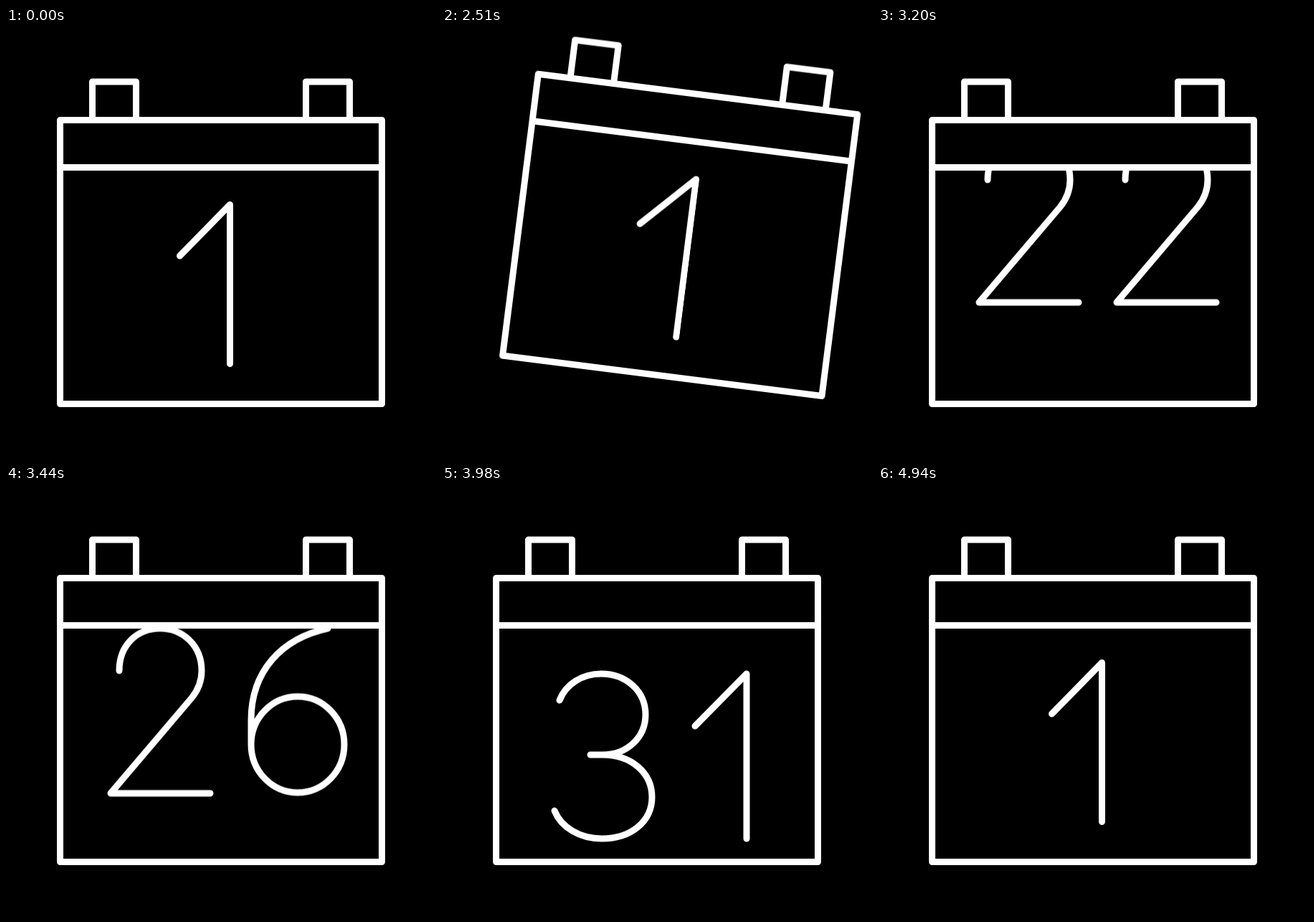
Write an HTML page that moves like this. It is 600 by 600 pixels and loops after 4970 ms.

```html
<!DOCTYPE html>
<html lang="en">
<head>
<meta charset="utf-8">
<title>Calendar</title>
<style>
  html, body { margin: 0; width: 100%; height: 100%; overflow: hidden; background: #000; }
  svg { display: block; width: 100vw; height: 100vh; }
  .lines {
    fill: none; stroke: #fff; stroke-width: 9;
    stroke-linecap: round; stroke-linejoin: round;
  }
  #calendar { transform-origin: 300px 326px; animation: swing 4970ms infinite; }
  #drop { animation: drop 4970ms infinite; }

  /* lift and tilt, slam down past rest, settle */
  @keyframes swing {
    0% { transform: translate(0, 0) rotate(0deg); }
    40.241% {
      transform: translate(0, 0) rotate(0deg);
      animation-timing-function: cubic-bezier(.25, 0, .3, 1);
    }
    48.089% {
      transform: translate(34.8px, -41.7px) rotate(8deg);
      animation-timing-function: cubic-bezier(.8, 0, .2, 1);
    }
    56.137% {
      transform: translate(2px, 10px) rotate(-2deg);
      animation-timing-function: cubic-bezier(.35, 0, .4, 1);
    }
    61.972%, 100% { transform: translate(0, 0) rotate(0deg); }
  }

  /* the first day falls back in */
  @keyframes drop {
    0% { transform: translateY(-290px); }
    84.507% {
      transform: translateY(-290px);
      animation-timing-function: cubic-bezier(.3, .6, .6, 1);
    }
    90.141% {
      transform: translateY(15px);
      animation-timing-function: cubic-bezier(.25, 0, .3, 1);
    }
    99.598%, 100% { transform: translateY(0); }
  }
</style>
</head>
<body>
<svg viewBox="0 0 600 600">
  <clipPath id="page"><rect x="76" y="195" width="449" height="329"/></clipPath>
  <g id="calendar" class="lines">
    <g clip-path="url(#page)">
      <g id="reel"></g>
      <path id="drop"/>
    </g>
    <path d="M75.5 128.5H524.5V524.5H75.5ZM75.5 194.5H524.5
             M120.5 128V75H181.5V128M418.5 128V75H479.5V128"/>
  </g>
</svg>
<script>
  const LOOP = 4970, PITCH = 400, BASE = 468;
  const FIRST_DAY = 'M242.5 318L312.5 246.5V468.5';

  // [advance, path], baseline at y = 0
  const GLYPHS = [
    [192, 'M103 -230A73 115 0 1 1 103 0A73 115 0 1 1 103 -230Z'],
    [140, 'M27 -157L99 -230V0'],
    [192, 'M45 -171C45 -207 70 -230 102 -230S160 -206 160 -171Q160 -150 146 -133L33 0H172'],
    [192, 'M30 -193C39 -216 62 -230 88 -230C124 -230 150 -205 150 -173S124 -117 90 -117H73H90C130 -117 159 -92 159 -58S130 0 89 0C58 0 32 -16 23 -39'],
    [190, 'M140 0V-230L30 -60H176'],
    [184, 'M155 -230H62L52 -130C100 -155 168 -140 168 -76C168 -30 135 0 95 0C65 0 42 -14 28 -36'],
    [182, 'M144 -230C79 -216 37 -170 37 -102V-68A65 67 0 1 0 167 -68A65 67 0 1 0 37 -68'],
    [180, 'M25 -230H160L70 0'],
    [190, 'M93 -118A56 56 0 1 1 93 -230A56 56 0 1 1 93 -118A67 59 0 1 1 93 0A67 59 0 1 1 93 -118Z'],
    [182, 'M167 -162A65 67 0 1 0 37 -162A65 67 0 1 0 167 -162V-128C167 -60 125 -14 60 0']
  ];

  const reel = document.getElementById('reel');
  const drop = document.getElementById('drop');
  drop.setAttribute('d', FIRST_DAY);

  function addPath(d, x, y) {
    const path = document.createElementNS('http://www.w3.org/2000/svg', 'path');
    path.setAttribute('d', d);
    path.setAttribute('transform', `translate(${x} ${y})`);
    reel.append(path);
  }

  function addDay(day) {
    const glyphs = [...String(day)].map(c => GLYPHS[c]);
    let x = 300 - glyphs.reduce((sum, [width]) => sum + width, 0) / 2;
    for (const [width, d] of glyphs) {
      addPath(d, x, BASE - (day - 1) * PITCH);
      x += width;
    }
  }

  addPath(FIRST_DAY, 0, 0);
  for (let day = 2; day <= 31; day++) addDay(day);

  // The days rush past at a speed that decays exponentially.
  const START = 2594, END = 4120, TRAVEL = 13584.8, DECAY = 641;
  const scroll = t => TRAVEL * (1 - Math.exp((START - t) / DECAY));
  const pose = (t, y) => ({ offset: t / LOOP, transform: `translateY(${y}px)` });
  const frames = [pose(0, 0)];
  for (let t = START; t < END; t += 10) frames.push(pose(t, scroll(t)));
  frames.push(pose(END, scroll(END)), pose(LOOP, scroll(END)));
  reel.animate(frames, { duration: LOOP, iterations: Infinity });

  // one shared clock for all parts
  const now = document.timeline.currentTime ?? 0;
  for (const animation of document.getAnimations()) animation.startTime = now;
</script>
</body>
</html>
```
